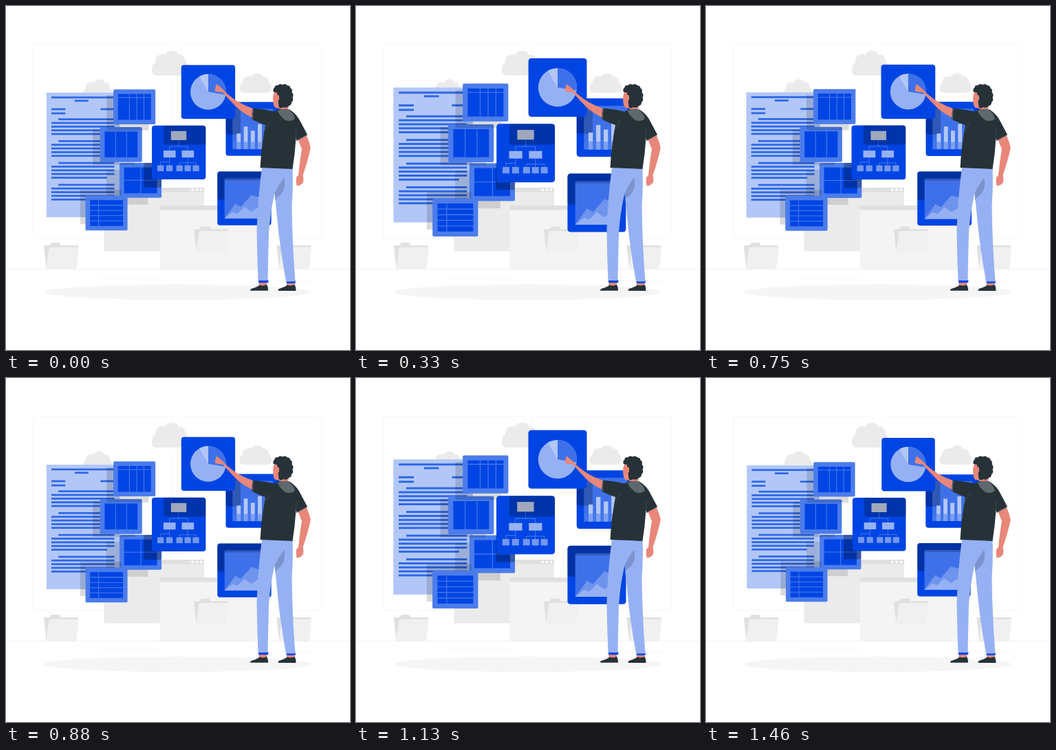
Recreate the animation shown at these times as an HTML page. Size 500 by 500 pixels, loop 1500 ms.

```html
<!DOCTYPE html>
<html lang="en">
<head>
<meta charset="utf-8">
<title>Data boards</title>
<style>
html, body { margin: 0; width: 100%; height: 100%; overflow: hidden; background: #fff; }
svg { display: block; width: 100%; height: 100%; }
</style>
</head>
<body>
<svg viewBox="0 0 500 500">
  <defs>
    <g id="folder">
      <path fill="#e0e0e0" d="M0 4.5Q0 4 1 4H8L10.5 .5Q11 0 12 0H21Q22 0 22.500 .5L25 4H48.500Q50 4 50 5.500V9L46 37H3.500Z"/>
      <path fill="#f0f0f0" d="M7.500 8.500Q8 6.500 10 6.500H49Q51 6.500 50.700 8.500L47.500 36Q47.200 38 45 38H5Q3 38 3.300 36Z"/>
    </g>
    <path id="cloud" fill="#ebebeb" d="M7 36Q0 36 0 28Q0 19 5 17Q5 7 12 6Q16 4 19 6Q22 0 29 0Q37 0 39 6Q48 4 49 16Q54 20 53.500 28Q53 36 46 36Z"/>
  </defs>

  <g fill="none" stroke="#f5f5f5" stroke-width=".8">
    <rect x="39.500" y="55.500" width="203.500" height="282" rx="2"/>
    <rect x="255" y="55.500" width="203.500" height="282" rx="2"/>
    <path d="M0 382.500H500" stroke="#ebebeb"/>
    <path d="M134 395.500H225M390 398.500H448"/>
  </g>
  <use href="#cloud" x="212" y="65"/>
  <use href="#cloud" transform="translate(339.500 98) scale(.87 .78)"/>
  <use href="#cloud" transform="translate(112 106.500) scale(.8)"/>
  <ellipse cx="249.500" cy="416" rx="194" ry="11.300" fill="#f5f5f5"/>

  <rect x="142.500" y="264" width="145.500" height="92.500" fill="#ebebeb"/>
  <rect x="142.500" y="264" width="145.500" height="6.500" fill="#e0e0e0"/>
  <g fill="#fff">
    <circle cx="271" cy="267.200" r="1.800"/>
    <circle cx="277.300" cy="267.200" r="1.800"/>
    <circle cx="283.600" cy="267.200" r="1.800"/>
  </g>
  <rect x="223.500" y="290" width="145.500" height="92" fill="#f4f4f4"/>
  <rect x="223.500" y="290" width="145.500" height="6.500" fill="#e0e0e0"/>
  <use href="#folder" x="55" y="344"/>
  <use href="#folder" x="273" y="320.500"/>
  <use href="#folder" x="393.500" y="344"/>

  <g id="doc"></g>
  <g id="tables"></g>
  <g id="charts"></g>

  <g id="man">
    <path fill="#e8877a" d="M367.500 401H379V407H367.500ZM408 402H419.500V408H408Z"/>
    <path fill="#263238" d="M355 413Q355 411 360 410Q365 408.500 369 405.500Q374 407.500 379 405Q381.500 409 381 413.800H356Q355 413.800 355 413ZM395.500 413Q395.500 411 400 410Q405 408.500 409 405.500Q414 407.500 419.500 405Q422 409 421.500 414H396.500Q395.500 414 395.500 413Z"/>
    <path fill="#0045e3" d="M366.800 398H381.200V402.200H367.200ZM407 399H420.700V403H408Z"/>
    <path fill="#96b1f3" d="M372 234L416.500 236Q417.500 262 415.500 290Q416 345 420.500 400.500H407Q398 350 394.500 312L390.500 272Q384 300 382 330Q381 370 380.500 399H366.500Q365 365 364.500 325Q366 280 372 234Z"/>
    <path fill="#7c93cd" d="M390.500 272Q396 260 404.500 249.500Q408 270 393 279Q392 283 391.500 283Z"/>
    <path fill="#e8877a" d="M358 148.500Q338 142 322 128L312.500 118.500L306 113.500L304.500 118L303.500 123.500Q309 125.500 315 125.500Q325 137 336 148Q346 157 360 163Z"/>
    <path fill="#e8877a" d="M424 193L436.500 187.500Q441 197 442.800 206Q439 224 431.500 246Q433 251 432 256Q428 262 422.500 261.300Q421 255 422 249L425 246Q427 225 430 208Q427 201 424 193Z"/>
    <path fill="#e8877a" d="M391 123Q387 131 388.300 138Q388.500 146 392 148L397.500 148.500L396 154L409 156L412 140Z"/>
    <path fill="#263238" d="M359 148.500Q375 150 390 153.500L397 150L412 150.500Q423 157 429 170L438 187L422.500 196L421.500 192Q420 215 416.500 237L369.500 235Q371 205 377 173Q368 170 357.500 165Q357 156 359 148.500Z"/>
    <path fill="#5f696d" d="M394.500 152.500Q399 149.500 408 149.500Q418 154 420 164Q414 169 406 166Q399 161 394.500 152.500Z"/>
    <path fill="none" stroke="#5f696d" d="M359.500 149Q358 156 358.800 165.500M437.500 187.500L422.500 195.500"/>
    <path fill="none" stroke="#45545a" stroke-width=".7" d="M384 167Q381 176 375 181M422 178L421 193"/>
    <path fill="#263238" d="M389 125Q387 121 390.500 118.500Q391 114.500 395 115.500Q398 112 402 114.500Q406 112 409 115.500Q413 115.500 413.500 119.500Q417 121 415.500 125.500Q419 129 416.500 133Q418.500 137 415 140Q415 144.500 411 145Q408 149 403 147Q399 150 396.500 146.500L395.500 138L394 126Z"/>
    <path fill="#e8877a" d="M396.800 130Q393 128 391.800 132Q391.500 137 395 138Q398 137 396.800 130Z"/>
  </g>
</svg>
<script>
const BLUE = '#0045e3', MID = '#4b7ceb', PANEL = '#3e71e9', SOFT = '#96b1f3', PALE = '#b2c7f7', INK = '#2e67e5';
const $ = id => document.getElementById(id);

const box = (x0, y0, x1, y1, fill, r = 0) =>
  `<rect x="${x0}" y="${y0}" width="${x1 - x0}" height="${y1 - y0}" rx="${r}" fill="${fill}"/>`;
const shade = (x0, y0, x1, y1, a, r = 0) => box(x0, y0, x1, y1, `rgba(0,0,0,${a})`, r);
const path = (d, fill) => `<path d="${d}" fill="${fill}"/>`;
const stroke = (d, color, w) => `<path d="${d}" fill="none" stroke="${color}" stroke-width="${w}"/>`;

function drawDoc() {
  const line = (y, x0 = 66.5, x1 = 157) => box(x0, y - 1.35, x1, y + 1.35, INK);
  let s = box(59.4, 127, 164.6, 306, PALE, 1);
  s += line(133.8) + line(138.6, 100, 119.7);
  s += line(150.7, 66.5, 86.5) + line(150.7, 137, 157) + line(156.7, 66.5, 86.5);
  for (let p = 0; p < 4; p++)
    for (let i = 0; i < 5; i++)
      s += line(165.2 + p * 31.4 + i * 5.3, i ? 66.5 : 76.5, i === 4 && p > 1 ? 146.5 : 157);
  return s;
}

// Table card: corner of the card, then grid lines relative to the panel
function table(x, y, cols, rows) {
  const px = x + 6.6, py = y + 6.5, w = 47.4, h = 37.2;
  const d = cols.map(c => `M${px + c} ${py}v${h}`).join('') + rows.map(r => `M${px} ${py + r}h${w}`).join('');
  return box(x, y, x + 60.4, y + 50.2, MID, 1.8) + box(px, py, px + w, py + h, BLUE) + stroke(d, MID, 1);
}

function drawTables() {
  return shade(146, 238, 206, 288, .12) +
    table(165, 228, [24], [18.5]) +
    shade(200, 228, 225.4, 263.5, .28, 2) +
    shade(126.5, 180, 187, 231, .14) +
    table(137, 176.4, [15.8, 31.6], []) +
    shade(146.5, 131, 207, 181.2, .14) +
    table(156.2, 122.4, [16.5, 27, 37.3], [5.2]) +
    shade(108.5, 266.5, 168, 316, .14) +
    table(116.1, 275, [12.3], [7.4, 14.9, 22.3, 29.8]);
}

const card = (x, y) => box(x, y, x + 77.5, y + 77.5, BLUE, 4);

function wedge(cx, cy, r, a0, a1, fill) {
  const at = a => `${cx + r * Math.sin(a * Math.PI / 180)} ${cy - r * Math.cos(a * Math.PI / 180)}`;
  return path(`M${cx} ${cy}L${at(a0)}A${r} ${r} 0 0 1 ${at(a1)}Z`, fill);
}

function drawBars() {
  let s = card(319.3, 140.2) + shade(319.3, 155, 340.5, 187, .28, 3) + box(329, 150, 387, 208, PANEL);
  s += shade(329, 150, 340.5, 187, .22);
  [185.5, 175.5, 181.5, 172, 178].forEach((y, i) => {
    const x = 335 + i * 10.1;
    s += box(x, y, x + 5.8, 208, PALE);
  });
  return s + box(329, 197.5, 387, 208, 'rgba(75,124,235,.5)');
}

function drawArea() {
  return card(307.2, 240) +
    path('M311.200 240H380.700Q384.700 240 384.700 244V252.500H317.500V281H310Q307.200 281 307.200 278V244Q307.200 240 311.200 240Z', 'rgba(0,0,0,.28)') +
    box(317.5, 250, 375, 307.7, PANEL) + shade(317.5, 250, 375, 252.8, .22) +
    path('M317.500 307.700L333 286.500L341 291L356 274L366 277L375 268V307.700Z', '#6f94ee') +
    path('M317.500 307.700L329 298.500L336 301L346 291L356 298L366 292L375 286V307.700Z', SOFT);
}

function drawTree() {
  let s = card(213, 174);
  s += stroke('M251.500 194V204M238.300 210V204H264.500V210M238.300 220V231.500M225.500 232V226.300H238.300M264.500 220V227.500M252.700 232V227.500H276.500V232M264.500 227V232', MID, .9);
  s += box(240.5, 182, 262.7, 195, '#d5e0fa') + box(229.7, 210, 247.2, 220, SOFT) + box(256, 210, 273.5, 220, SOFT);
  for (const x of [221, 233.7, 248.2, 260, 271.7]) s += box(x, 231.2, x + 9.2, 239.7, '#7397ee');
  return s + path('M230 174H286.400Q290.400 174 290.400 178V201.500H234Q230 201.500 230 197.500Z', 'rgba(0,0,0,.25)');
}

function drawPie() {
  const c = [294, 125.7, 25.6];
  return card(255.3, 87) + `<circle cx="${c[0]}" cy="${c[1]}" r="${c[2]}" fill="${SOFT}"/>` +
    wedge(...c, 0, 99, PANEL) + wedge(...c, -30, 0, PALE);
}

$('doc').innerHTML = drawDoc();
$('tables').innerHTML = drawTables();
$('charts').innerHTML = drawBars() + drawArea() + drawTree() + drawPie();

const LOOP = 1500, STEPS = 36;
const pivots = { doc: [112, 216.5], tables: [167, 223.5], charts: [304.8, 202] };
// Double heartbeat: [ms, scale]
const beat = [[-33, 1], [265, 1.1], [843, 1], [1132, 1.1], [1460, 1], [1467, 1], [1765, 1.1]];

function scaleAt(t) {
  const i = beat.findIndex(k => k[0] > t);
  const [t0, a] = beat[i - 1], [t1, b] = beat[i];
  return a + (b - a) * (t - t0) / (t1 - t0);
}

function render(ms) {
  const step = Math.floor(((ms + 2) % LOOP) * STEPS / LOOP);
  const k = scaleAt(step * LOOP / STEPS);
  for (const id in pivots) {
    const [x, y] = pivots[id];
    $(id).setAttribute('transform', `translate(${x} ${y}) scale(${k}) translate(${-x} ${-y})`);
  }
}

const start = performance.now();
function tick(now) {
  render(Math.max(0, now - start));
  requestAnimationFrame(tick);
}
render(0);
requestAnimationFrame(tick);
</script>
</body>
</html>
```
